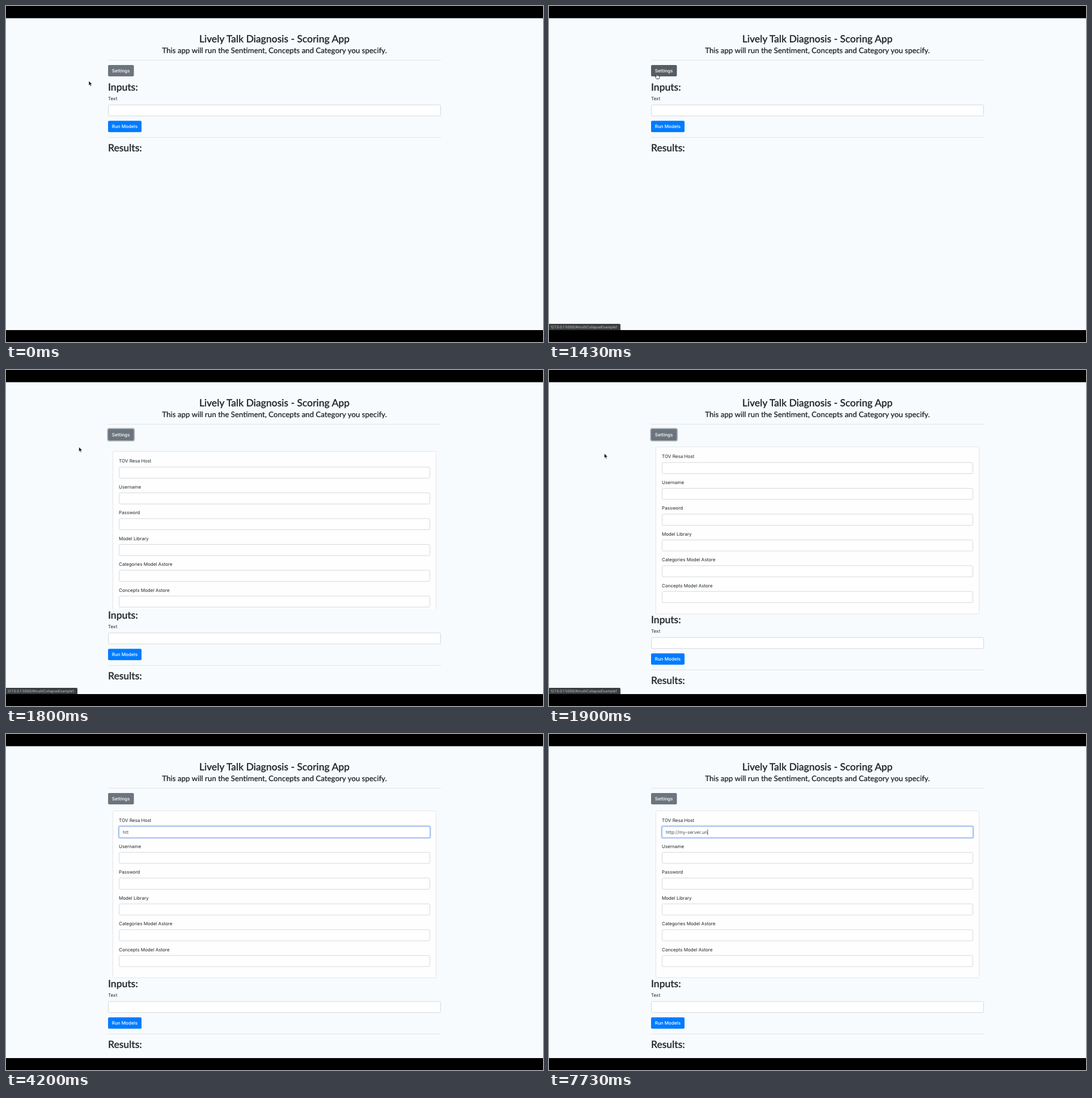
An HTML page for the animation above (8 s loop, 947 by 592 pixels).

```html
<!DOCTYPE html>
<html lang="en">
<head>
<meta charset="utf-8">
<title>Scoring App</title>
<style>
html, body { margin: 0; height: 100%; overflow: hidden; background: #000; }
svg { display: block; width: 947px; height: 592px; }
text { font: 8.05px Inter, sans-serif; fill: #212529; text-rendering: geometricPrecision; }
.head, .sub { font: 500 17.5px Lato, sans-serif; stroke: #212529; stroke-width: .3; }
.sub { font-size: 13.3px; stroke-width: .2; }
.mid { text-anchor: middle; }
.btn { font-weight: 500; fill: #fff; }
.field { fill: #fff; stroke: #d3d8dd; }
.rule { fill: #e0e4e7; }
</style>
</head>
<body>
<svg viewBox="0 0 947 592">
  <defs>
    <clipPath id="page"><rect y="21.5" width="947" height="549.5"/></clipPath>
    <clipPath id="fold"><rect id="foldBox" x="180" y="132.5" width="587"/></clipPath>
  </defs>
  <g clip-path="url(#page)">
    <rect width="947" height="592" fill="#f7fbfe"/>
    <text class="head mid" x="473.3" y="63.5">Lively Talk Diagnosis - Scoring App</text>
    <text class="sub mid" x="473.4" y="83.4">This app will run the Sentiment, Concepts and Category you specify.</text>
    <rect class="rule" x="180" y="95" width="587" height="1"/>
    <rect id="ring" x="179.2" y="103.2" width="47.1" height="21.6" rx="2.8" fill="none" stroke="#a9b0b6" stroke-width="1.7"/>
    <rect id="settings" x="180" y="104" width="45.5" height="20" rx="2"/>
    <text class="btn mid" x="202.6" y="117">Settings</text>

    <g clip-path="url(#fold)">
      <g id="card">
        <rect x="188.5" y="135.5" width="570" height="294" rx="2" fill="#fefefe" stroke="#e3e6e8"/>
        <g id="rows"></g>
        <g id="focus" fill="none">
          <rect x="198.2" y="161.7" width="550.6" height="22" rx="3" stroke="#bdd2f7" stroke-width="1.7"/>
          <rect x="199.5" y="163" width="548" height="19.6" rx="2" stroke="#98b9f2"/>
        </g>
        <text id="typed" x="206" y="175.9" style="fill:#495057"></text>
        <rect id="caret" y="168" width=".9" height="10" fill="#495057"/>
      </g>
    </g>

    <g id="lower">
      <text class="head" x="180" y="149">Inputs:</text>
      <text x="180" y="166.2">Text</text>
      <rect class="field" x="180.5" y="174.2" width="586" height="19.6" rx="2"/>
      <rect x="180" y="202.3" width="59" height="20" rx="2" fill="#007bff"/>
      <text class="btn mid" x="209.4" y="215.4">Run Models</text>
      <rect class="rule" x="180" y="231" width="587" height="1"/>
      <text class="head" x="180" y="256">Results:</text>
    </g>

    <g id="status">
      <path d="M0 560H124q2 0 2 2V571H0z" fill="#3b3e41"/>
      <text x="2.5" y="568" style="font-size:6.4px;fill:#c3c5c7">127.0.0.1:5000/#multiCollapseExample1</text>
    </g>

    <g id="pointer">
      <path id="arrow" d="M0 0V8.3L1.9 6.6 3.2 9.6 4.6 9 3.3 6.1H6z" fill="#111" stroke="#fff" stroke-width=".6"/>
      <path id="hand" d="M-.8 5V.6Q0-.6.8.6V3.2Q3.6 3 5 4.4V6.4L4 9H-.4L-2.9 5.2Q-2.6 4-.8 5z" fill="#fff" stroke="#222" stroke-width=".8"/>
      <path id="beam" d="M-1.8-4.6Q0-4.6 0-3.4 0-4.6 1.8-4.6M0-3.4V3.4M-1.8 4.6Q0 4.6 0 3.4 0 4.6 1.8 4.6M-1 1.4H1" fill="none" stroke="#333" stroke-width=".9"/>
    </g>
  </g>
</svg>
<script>
const $ = id => document.getElementById(id);
const LOOP = 8000, STEP = 100 / 3;
const labels = ['TOV Resa Host', 'Username', 'Password', 'Model Library',
  'Categories Model Astore', 'Concepts Model Astore'];
$('rows').innerHTML = labels.map((label, i) => `<g transform="translate(0 ${i * 45.45})">
  <text x="199" y="155.3">${label}</text>
  <rect class="field" x="199.5" y="163" width="548" height="19.6" rx="2"/></g>`).join('');

// Pointer stops: time, x, y
const path = [[400, 146, 132], [1060, 190, 119.5], [1500, 190, 119.5], [1667, 170, 120.5],
  [1900, 97.5, 147], [2030, 86, 154], [2260, 167, 168], [2480, 235, 170.5],
  [2700, 235, 170.5], [2860, 502, 185]];

// Keystrokes: time, key ('<' deletes)
const keys = [[3430, 'h'], [3560, 't'], [3700, 't'], [4500, 'p'], [4800, ':'], [5000, '/'],
  [5130, '/'], [5330, '/'], [5700, '<'], [5830, 'm'], [6130, 'y'], [6460, '-'], [6600, 's'],
  [6630, 'e'], [6830, 'r'], [7000, 'v'], [7100, 'e'], [7200, 'r'], [7260, '.'],
  [7530, 'u'], [7730, 'n']];

const PRESS = 1430, OPEN = 1549.5, OPEN_END = 1899.5, FOCUS = 2560;
const ramp = (t, from, to) => Math.min(1, Math.max(0, (t - from) / (to - from)));
const smooth = p => p * p * (3 - 2 * p);
const show = (id, on) => $(id).style.opacity = Number(on);

// CSS "ease": cubic-bezier(.25, .1, .25, 1)
function ease(p) {
  const bez = (a, b, s) => 3 * a * s * (1 - s) ** 2 + 3 * b * s * s * (1 - s) + s ** 3;
  let lo = 0, hi = 1;
  for (let i = 0; i < 20; i++) {
    const s = (lo + hi) / 2;
    if (bez(.25, .25, s) < p) lo = s; else hi = s;
  }
  return bez(.1, 1, lo);
}

function pointerAt(t) {
  let [, x, y] = path[0];
  for (let i = 1; i < path.length; i++) {
    const [t0, x0, y0] = path[i - 1], [t1, x1, y1] = path[i];
    if (t < t0) break;
    const p = ramp(t, t0, t1);
    const q = i === 1 || i === path.length - 1 ? smooth(p) : p;
    x = x0 + (x1 - x0) * q;
    y = y0 + (y1 - y0) * q;
  }
  return [x, y];
}

function draw(t) {
  // Settings button
  const dark = t < PRESS ? 0 : 1 - ramp(t, 1620, 1770);
  $('settings').style.fill = `rgb(${108 - 22 * dark},${117 - 23 * dark},${125 - 25 * dark})`;
  show('ring', ramp(t, PRESS + 30, PRESS + 150) * (1 - ramp(t, FOCUS, FOCUS + 150)));
  show('status', ramp(t, 850, 1000) * (1 - ramp(t, 2110, 2230)));

  // Collapsible panel: the margins merge once it is fully open
  const opened = t >= OPEN_END;
  const shift = opened ? 297 : 305 * ease(ramp(t, OPEN, OPEN_END));
  $('foldBox').setAttribute('height', shift + (opened ? 1 : 0));
  $('card').setAttribute('transform', `translate(0 ${opened ? 0 : 8})`);
  $('lower').setAttribute('transform', `translate(0 ${shift})`);

  // Host field
  let value = '', last = FOCUS;
  for (const [at, key] of keys) {
    if (at > t) break;
    value = key === '<' ? value.slice(0, -1) : value + key;
    last = at;
  }
  show('focus', ramp(t, FOCUS, FOCUS + 150));
  $('typed').textContent = value;
  $('caret').setAttribute('x', 206 + (value ? $('typed').getComputedTextLength() : 0));
  show('caret', t >= FOCUS && (t - last) % 1000 < 500);

  // Pointer
  const [x, y] = pointerAt(t);
  const onButton = t < 1800 && x >= 180 && y < 124;
  const onField = opened && x >= 199 && y > 162.5 && y < 183;
  $('pointer').setAttribute('transform', `translate(${x} ${y})`);
  show('pointer', t < keys[0][0]);
  show('hand', onButton);
  show('beam', onField);
  show('arrow', !onButton && !onField);
}

const start = performance.now();
function tick() {
  const t = (performance.now() - start) % LOOP;
  draw(Math.floor((t + 7) / STEP) * STEP);
  requestAnimationFrame(tick);
}
draw(0);
requestAnimationFrame(tick);
</script>
</body>
</html>
```
